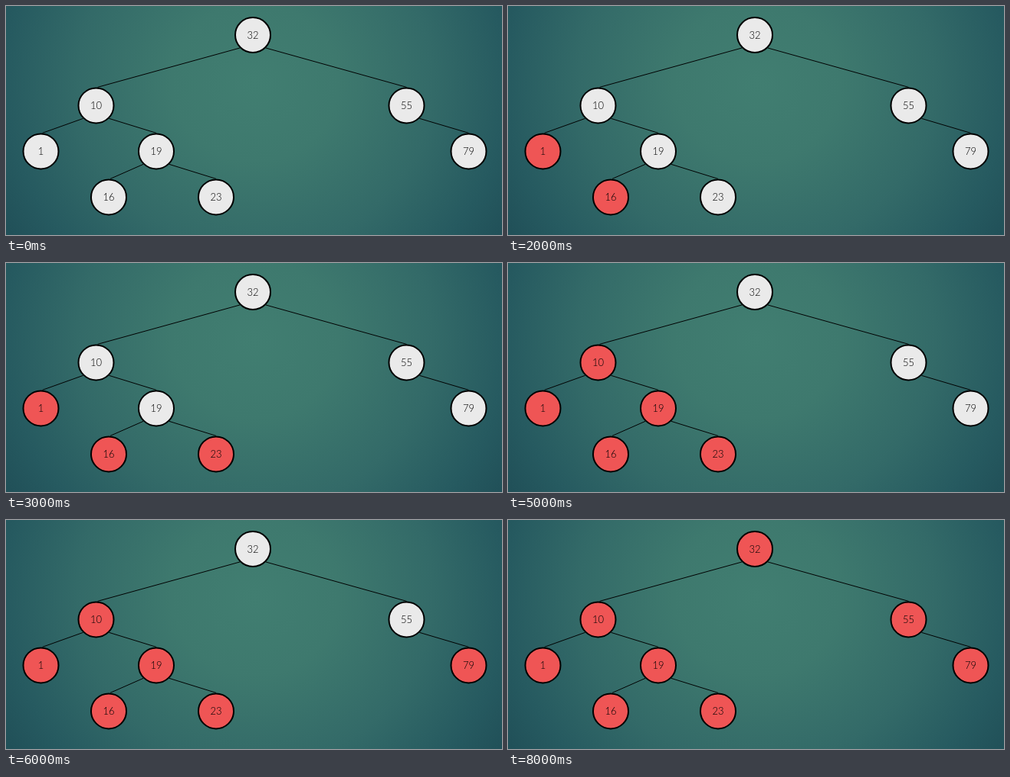
Write an HTML page that moves like this. It is 647 px wide and 300 px high and loops after 9000 ms.

```html
<!DOCTYPE html>
<html lang="en">
<head>
<meta charset="utf-8">
<title>Post-order traversal</title>
<style>
html, body { margin: 0; width: 100%; height: 100%; overflow: hidden; }
body { background: radial-gradient(ellipse 365px 345px at 325px 100px, #417e71, #3e796e 30%, #336a68 64%, #265a60 90%, #1f4d56 110%); }
svg { display: block; }
line { stroke: #000; stroke-width: 1; }
circle { stroke: #000; stroke-width: 2; }
text { font: 300 13px Lato, "Open Sans", sans-serif; text-anchor: middle; fill: #000; }
</style>
</head>
<body>
<svg id="tree" width="647" height="300" viewBox="0 0 647 300"></svg>
<script>
const STEP = 1000, LOOP = 9000, RADIUS = 23;
const PLAIN = '#eaeaea', VISITED = '#ef5555';
const svg = document.getElementById('tree');

const node = (value, x, left, right) => ({ value, x, left, right });
const root = node(32, 322,
  node(10, 117.5,
    node(1, 45.5),
    node(19, 196, node(16, 134), node(23, 274))),
  node(55, 522.5, null, node(79, 603.5)));

function add(tag, attrs, label = '') {
  const el = document.createElementNS('http://www.w3.org/2000/svg', tag);
  for (const key in attrs) el.setAttribute(key, attrs[key]);
  el.textContent = label;
  return svg.appendChild(el);
}

const levelY = depth => depth ? 70.4 + 60 * depth : 38;

// Draws a subtree and returns its circles in post-order.
function drawTree(tree, depth = 0) {
  if (!tree) return [];
  const { value, x, left, right } = tree;
  const y = levelY(depth), edge = RADIUS + 1, corner = edge * Math.SQRT1_2;
  const link = (child, side, shift) => child && add('line', {
    x1: x + side * corner, y1: y + corner,
    x2: child.x + shift, y2: levelY(depth + 1) - edge
  });
  link(left, -1, 2);
  link(right, 1, 0);
  const circle = add('circle', { cx: x, cy: y, r: RADIUS, fill: PLAIN });
  add('text', { x, y: y + 4.5 }, value);
  return [...drawTree(left, depth + 1), ...drawTree(right, depth + 1), circle];
}

const circles = drawTree(root);
const start = performance.now();

function draw() {
  const t = (performance.now() - start) % LOOP;
  circles.forEach((c, i) => c.setAttribute('fill', t >= (i + 1) * STEP ? VISITED : PLAIN));
  requestAnimationFrame(draw);
}
draw();
</script>
</body>
</html>
```
